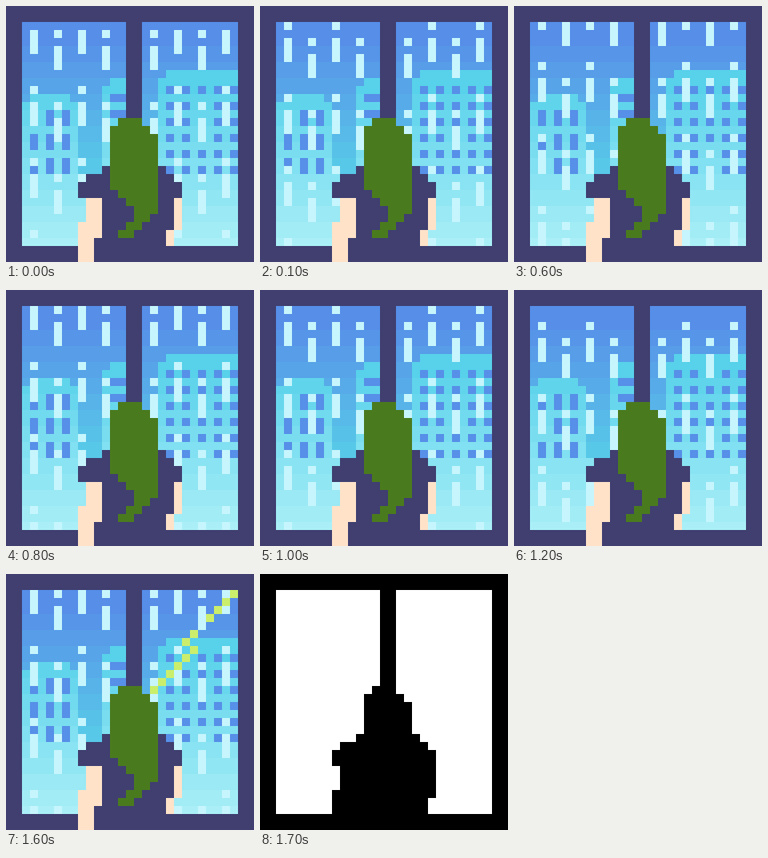
An HTML page with a canvas that plays this animation: 310 by 320 pixels, repeating every 1800 ms.

```html
<!DOCTYPE html>
<html>
<head>
<meta charset="utf-8">
<title>Rainy window</title>
<style>
html, body { margin: 0; width: 100%; height: 100%; overflow: hidden; background: #403f70; }
canvas { display: block; }
</style>
</head>
<body>
<canvas id="stage" width="310" height="320"></canvas>
<script>
const ctx = document.getElementById('stage').getContext('2d');
const CELL = 10, STEP = 100, STEPS = 18;
const STRIKE = 16, FLASH = 17;
const HORIZON = 21, SILL = 30;
const DARK = '#403f70', HAIR = '#4a7a1e', SKIN = '#ffe2c8';
const PANE = '#5790e8', RAIN = '#c6f5fd', BOLT = '#caee6c';

// All coordinates are grid cells.
function box(color, x, y, w = 1, h = 1) {
  ctx.fillStyle = color;
  ctx.fillRect(x * CELL, y * CELL, w * CELL, h * CELL);
}

// Both gradients change every second row.
const band = (y, top) => Math.max(0, Math.floor((y - top) / 2));

function sky(y) {
  const b = band(y, 3);
  return `rgb(${86 + b * 0.3}, ${142 + b * 7.3}, 232)`;
}

function haze(y) {
  const b = band(y, 9);
  return `rgb(${88 + b * 8.2}, ${209 + b * 3}, ${234 + b * 1.3})`;
}

function shade(color, x, y, w, bottom) {
  for (; y < bottom; y++) box(color(y), x, y, w);
}

// A block whose top row is inset at the corners.
function tower(x, y, w, left, right) {
  box(haze(y), x + left, y, w - left - right);
  shade(haze, x, y + 1, w, HORIZON);
}

function city() {
  shade(sky, 2, 2, 27, HORIZON);
  shade(haze, 2, HORIZON, 27, SILL);
  tower(2, 11, 7, 1, 1);
  tower(12, 9, 5, 1, 0);
  tower(19, 8, 10, 1, 0);
  for (let y = 13; y < HORIZON; y += 3)
    for (let x = 3; x < 9; x += 2) box(PANE, x, y, 1, 2);
  for (let y = 11; y < 15; y += 2) box(PANE, 13, y, 2);
  for (let y = 10; y < HORIZON; y += 2)
    for (let x = 20; x < 29; x += 2) box(PANE, x, y);
}

function rain(fall) {
  for (let x = 3; x < 29; x += 3) {
    const lead = x % 2 ? 1 : 3;
    for (let y = (lead + fall) % 9 - 9; y < SILL; y += 9) {
      box(RAIN, x, y);
      box(RAIN, x, y + 2, 1, 3);
    }
  }
}

function streak(x, y, length) {
  for (let i = 0; i < length; i++) box(BOLT, x - i, y + i);
}

function bolt() {
  streak(28, 2, 4);
  streak(23, 7, 2);
  streak(23, 9, 6);
}

function wall(color) {
  box(color, 0, 0, 31, 2);
  box(color, 0, SILL, 31, 2);
  box(color, 0, 0, 2, 32);
  box(color, 29, 0, 2, 32);
  box(color, 15, 2, 2, 28);
}

function person(shirt, skin, hair) {
  // Left arm, then right arm
  box(skin, 10, 24, 2, 5);
  box(skin, 9, 27, 2, 5);
  box(skin, 21, 24, 1, 4);
  // Shoulders and back
  box(shirt, 12, 20, 8, 10);
  box(shirt, 10, 21, 11);
  box(shirt, 9, 22, 13, 2);
  box(shirt, 20, 24, 1, 4);
  box(shirt, 11, 29, 9, 3);
  box(skin, 20, 28, 1, 2);
  // Hair, narrowing to a curl at the bottom
  for (let y = 14; y < 29; y++) {
    const left = Math.max(13, 28 - y, Math.min(y - 9, 42 - y));
    const right = Math.min(19, y + 3, 44 - y);
    box(hair, left, y, right - left);
  }
}

function draw(step) {
  if (step === FLASH) {
    box('#fff', 0, 0, 31, 32);
    wall('#000');
    person('#000', '#000', '#000');
    return;
  }
  city();
  // The rain skips a row as the lightning strikes.
  rain(step < STRIKE ? step : step + 1);
  if (step === STRIKE) bolt();
  wall(DARK);
  person(DARK, SKIN, HAIR);
}

const start = performance.now();
function tick() {
  draw(Math.floor((performance.now() - start) / STEP) % STEPS);
  requestAnimationFrame(tick);
}
tick();
</script>
</body>
</html>
```
